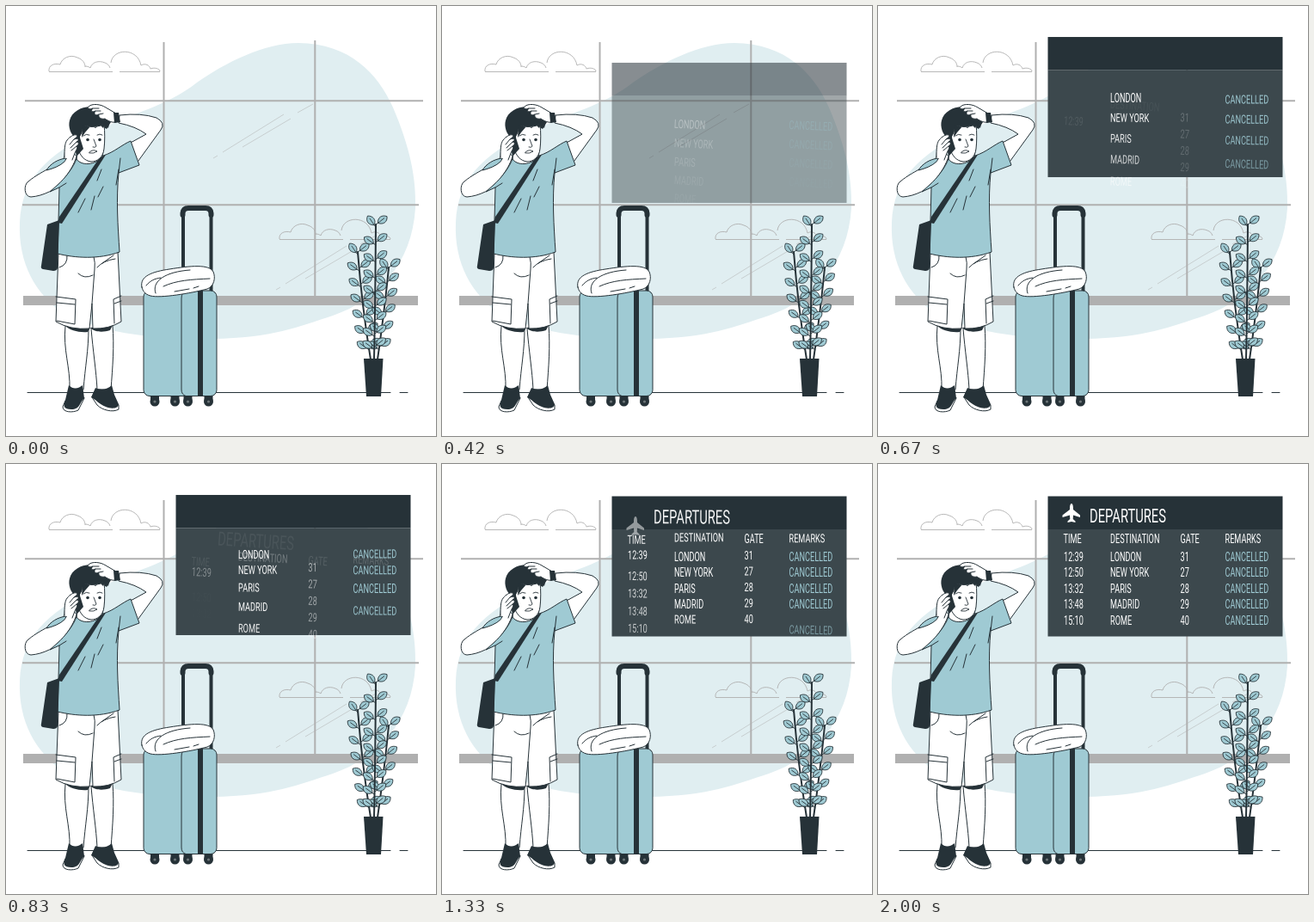
Animation of 500x500 px, one loop 2040 ms. Source, as an HTML page:

```html
<!DOCTYPE html>
<html lang="en">
<head>
<meta charset="utf-8">
<title>Departures</title>
<style>
html, body { margin: 0; width: 100%; height: 100%; overflow: hidden; background: #fff; }
svg { display: block; width: 100%; height: 100%; }
text { font: 14px Roboto, Arial, sans-serif; fill: #fff; }
.title { font-size: 22.5px; }
.late { fill: #9fcad3; }
.ink { fill: none; stroke: #263238; stroke-width: 1; stroke-linecap: round; stroke-linejoin: round; }
.dark { fill: #263238; }
.white { fill: #fff; }
.grey { fill: none; stroke: #b0b0b0; }
</style>
</head>
<body>
<svg viewBox="0 0 500 500">
  <path fill="#e0eef1" d="M16 252C18 200 50 172 100 148C150 122 185 118 222 89C255 66 300 43 340 43C400 44 432 78 450 118C470 165 477 200 476 235C472 300 432 342 380 360C340 373 310 386 240 387C170 388 110 380 66 357C35 335 14 300 16 252Z"/>

  <!-- window -->
  <g id="cloud" class="grey" stroke-width=".9">
    <path d="M50 76C49 69 56 66 63 68C65 60 75 56 83 60C89 62 92 66 92 71M92 70C95 70 97 71 98 72C100 65 108 63 115 66C118 67 120 69 121 72M122 66C124 49 153 48 157 69C162 66 167 69 168 73C173 71 179 73 179 76M50 76.500H124M132 76.500H179"/>
  </g>
  <use href="#cloud" x="268" y="195"/>
  <g id="glint" class="grey" stroke-width=".8" opacity=".65">
    <path d="M241 177L246 174M252 170L323 126M275 164L331 131M339 124L357 114"/>
  </g>
  <use href="#glint" x="73" y="153"/>
  <path class="grey" stroke-width="2" d="M22 110.300H485M19 231.300H480M183.500 42V338M359.300 40V338"/>
  <path fill="#b0b0b0" d="M20 337H479V348H20Z"/>
  <path class="ink" d="M25 449.500H447M458 449.500H467"/>

  <g id="plant">
    <path class="dark" d="M416 410H438.500L436 454H419Z"/>
  </g>

  <!-- luggage -->
  <path class="ink" style="stroke-width:4" d="M206 306V244M238.500 331V244"/>
  <path class="ink" style="stroke-width:6" d="M205.500 243V241Q206 235 212 235H232Q238 235 238.500 241V243"/>
  <g id="wheels"></g>
  <rect class="ink" x="160" y="331" width="85" height="122.500" rx="7" style="fill:#9fcad3"/>
  <path class="ink" d="M209 331Q204 333 204 340V446Q204 452 209 453.500"/>
  <path class="dark" d="M223 331H229V453.500H223Z"/>
  <path class="ink" style="fill:#fff" d="M158 327C155 314 170 309 190 306C215 302 236 300 241 309C244 316 242 326 234 329C215 334 180 340 168 337C161 335 159 331 158 327Z"/>
  <path class="ink" d="M174 334C169 320 185 309 214 307M163 325C168 319 173 317 180 316M183 326C198 319 215 318 237 317M196 332L213 329M218 328L224 326"/>

  <!-- traveller: legs and shoes -->
  <g class="ink" style="fill:#fff">
    <path d="M69 372C66 400 75 420 74 446H90C92 420 96 400 96 375ZM99 375C101 400 105 425 106 446H122C124 420 126 395 124 372Z"/>
    <path d="M69 459L66 466C66 473 78 473 84 470L91 456ZM100 455L106 464C112 470 124 473 131 469V464Z"/>
  </g>
  <path class="dark" d="M73 441C79 447 85 444 89 441L91 456C85 462 86 469 76 469C67 469 66 465 69 458ZM104 444C110 447 118 446 123 441L126 452L131 463C131 468 123 469 116 466C108 463 104 457 99 455ZM69 372L98 374L95 379C85 380 74 377 69 372ZM98 374L124 371L121 377C112 380 102 379 98 374Z"/>

  <!-- shorts -->
  <path class="ink" style="fill:#fff" d="M61 286L58 367Q75 377 97 375L100 346L101 375Q119 376 134 367L130 286Z"/>
  <path class="ink" d="M100 346L103 306Q104 299 102 291M58 338L81 341L80 370L59 366M59 345L80 347M134 337L125 341L126 369M126 346L134 343M71 290Q72 301 62 304M84 311Q91 318 101 313M106 304Q113 296 127 294M112 299L125 290"/>

  <!-- arms -->
  <path class="ink" style="fill:#fff" d="M69 163L68 175C65 184 43 190 26 204C20 208 21 222 29 222C43 221 60 213 66 203C76 190 79 184 82 175Z"/>
  <path class="ink" style="fill:#fff" d="M151 184L180 144Q186 136 175 130Q157 124 132 127L131 136Q151 140 163 149L143 160Z"/>

  <!-- shirt -->
  <path class="ink" style="fill:#fff" d="M84 160L82 179C88 186 105 188 112 176L114 160Z"/>
  <path class="ink" style="fill:#9fcad3" d="M82 178C87 186 104 186 113 174C126 170 135 161 145 157L155 185L131 194C128 225 130 255 132 286C108 295 80 293 60 288L62 211L51 216L60 208C69 200 78 188 82 178Z"/>
  <path class="ink" style="fill:#9fcad3" d="M70 177C60 178 51 184 47 191C55 189 63 186 68 181Z"/>
  <path class="ink" d="M131 194L133 177M128 208L131 190M103 221L99 237M84 240L92 224M111 190L106 203M62 211L70 206M113 210L107 222"/>
  <path class="dark" d="M109 176L116 173L65 253L60 252L62 245Z"/>
  <path class="dark" d="M48 254L62 249L60 305Q59 308 55 308L43 306Q40 305 41 302Z"/>

  <!-- head -->
  <path class="dark" d="M81 153C75 150 72 140 74 133C77 121 92 115 104 118C115 119 120 127 122 135L117 143L112 140L108 145L88 160Z"/>
  <path class="ink" style="fill:#fff" d="M86 151C89 147 88 142 91 139C99 141 108 141 114 137C115 147 115 157 114 166C113 176 106 181 99 181C91 180 86 174 84 166Z"/>
  <path class="dark" d="M89 138C100 143 111 141 116 134L121 132L119 142L115 138L113 142L109 138L104 142L99 139L92 147L88 153Z"/>
  <path class="ink" style="stroke-width:.9" d="M90 151Q93 148 97 150M106 150Q109 148 112 150M102 155L105 163Q104 165 101 164M97 170Q101 166 106 169Q102 172 97 171Z"/>
  <circle class="dark" cx="95" cy="155.500" r="1.800"/>
  <circle class="dark" cx="109" cy="155.500" r="1.800"/>

  <!-- hands, phone, watch -->
  <path class="dark" d="M78 153L85 150L90 166L82 175Z"/>
  <path class="ink" style="fill:#fff" d="M68 176C68 167 68 160 71 156C74 152 79 149 82 150C84 151 82 153 79 155C84 153 86 156 82 158C85 158 85 161 82 163C84 165 81 168 80 171L77 179"/>
  <path class="ink" d="M74 161L79 155M75 165L82 158M76 168L82 163"/>
  <path class="ink" style="fill:#fff" d="M128 125L116 118C110 114 100 113 96 117C94 119 97 121 101 119C98 122 100 124 104 122C101 126 105 128 108 126C107 130 111 132 115 131C119 134 124 136 128 135Z"/>
  <path class="ink" d="M101 119L108 119M104 122L110 122M108 126L113 125"/>
  <path class="dark" d="M125 124L131 124L133 135L126 136Z"/>

  <!-- departure board -->
  <rect id="panel" fill="#3c484d" x="197.500" y="76" width="273" height="124.500"/>
  <rect id="header" class="dark" x="197.500" y="37.500" width="273" height="38.500"/>
  <g id="labels"></g>
</svg>
<script>
const NS = 'http://www.w3.org/2000/svg', LOOP = 2040;
const $ = id => document.getElementById(id);

function add(parent, tag, attrs) {
  const el = document.createElementNS(NS, tag);
  for (const key in attrs) el.setAttribute(key, attrs[key]);
  return parent.appendChild(el);
}

for (const x of [173, 196.5, 211.5, 235.5]) {
  add($('wheels'), 'path', { class: 'dark', d: `M${x - 5} 452h10v7h-10Z` });
  add($('wheels'), 'circle', { class: 'dark', cx: x, cy: 460, r: 5.5 });
  add($('wheels'), 'circle', { fill: '#6b7477', cx: x, cy: 460, r: 1.6 });
}

// Bowed stems carry pairs of leaves up to the tip
function leaf(x, y, angle, flip) {
  add($('plant'), 'path', {
    class: 'ink', style: 'fill:#9fcad3;stroke-width:.8',
    d: 'M0 0L3 0C6-6 12-6 16-1C13 5 7 5 3 0L12-1',
    transform: `translate(${x} ${y}) scale(${flip} 1) rotate(${angle})`
  });
}
for (const [x0, x1, top, pairs] of [[424, 409, 286, 6], [432, 445, 304, 5], [428, 430, 254, 8]]) {
  const bow = (x0 + 2 * x1) / 3;
  const at = (a, b, c, k) => (1 - k) ** 2 * a + 2 * k * (1 - k) * b + k * k * c;
  add($('plant'), 'path', {
    class: 'ink', style: 'stroke-width:2',
    d: `M${x0} 411Q${bow} 350 ${x1} ${top}`
  });
  for (let i = 0; i <= pairs; i++) {
    const k = .12 + .88 * i / pairs;
    const x = at(x0, bow, x1, k), y = at(411, 350, top, k);
    leaf(x, y, -32, 1);
    leaf(x, y + 3, i < pairs ? -30 : -50, -1);
  }
}

// cubic-bezier(.36, -.01, .5, 1.38)
function ease(x) {
  if (x <= 0) return 0;
  if (x >= 1) return 1;
  const curve = (a, b, s) => 3 * a * s * (1 - s) ** 2 + 3 * b * s * s * (1 - s) + s ** 3;
  let lo = 0, hi = 1;
  for (let i = 0; i < 24; i++) {
    const mid = (lo + hi) / 2;
    if (curve(.36, .5, mid) < x) lo = mid; else hi = mid;
  }
  return curve(-.01, 1.38, lo);
}

const START = 182, TILT = 4, items = [];
const smooth = p => p * p * (3 - 2 * p);
const boost = gain => p => p * (1 + gain * (1 - p));

function slide(el, { start = START, span = 1000, rise = 30, fade = p => p, pivot }) {
  items.push({ el, start, span, rise, fade, pivot });
}
function label(str, x, y, timing, cls = '') {
  const g = add($('labels'), 'g', {});
  const t = add(g, 'text', { class: cls, transform: `translate(${x} ${y}) scale(.655 1)` });
  t.textContent = str;
  slide(g, { ...timing, pivot: [x + 25, y - 5] });
}

slide($('panel'), { span: 680, rise: 50, fade: boost(.2) });
slide($('header'), { span: 680, rise: 50, fade: boost(.5) });

const icon = add($('labels'), 'g', {});
add(icon, 'path', {
  class: 'white',
  d: 'M225 46C226.500 46 227 49 227 53L235 59.500V62L227 59.500L226.700 64L229.500 66.500V68L225 67L220.500 68V66.500L223.300 64L223 59.500L214.500 62V59.500L223 53C223 49 223.500 46 225 46Z'
});
slide(icon, { start: 946 });

label('DEPARTURES', 246, 68, { start: 695 }, 'title');
label('TIME', 215.5, 92, { start: 675 });
label('DESTINATION', 270, 92, { start: 553 });
label('GATE', 351.5, 92, { start: 649 });
label('REMARKS', 403.5, 92, { start: 616 });

const rows = [
  // time, city, gate, start of time, span of city, span of remark
  ['12:39', 'LONDON', '31', 505, 714, 740],
  ['12:50', 'NEW YORK', '27', 765, 800, 835],
  ['13:32', 'PARIS', '28', 797, 908, 950],
  ['13:48', 'MADRID', '29', 835, 1030, 1150],
  ['15:10', 'ROME', '40', 860, 1200]
];
rows.forEach(([time, city, gate, timeStart, citySpan, lateSpan], i) => {
  const y = 112.5 + 18.6 * i;
  const early = span => ({ span, rise: 50, fade: smooth });
  label(time, 216, y, { start: timeStart });
  label(city, 270, y, early(citySpan));
  label(gate, 351.5, y, { start: 420 + 13 * i });
  label('CANCELLED', 403.5, y, lateSpan ? early(lateSpan) : { start: 885 }, 'late');
});

function draw() {
  const t = performance.now() % LOOP;
  for (const { el, start, span, rise, fade, pivot } of items) {
    const p = ease((t - start) / span);
    const turn = pivot ? ` rotate(${TILT * (1 - p)} ${pivot})` : '';
    el.setAttribute('transform', `translate(0 ${rise * (1 - p)})${turn}`);
    el.setAttribute('opacity', Math.max(0, Math.min(1, fade(p))));
  }
  requestAnimationFrame(draw);
}
draw();
</script>
</body>
</html>
```
